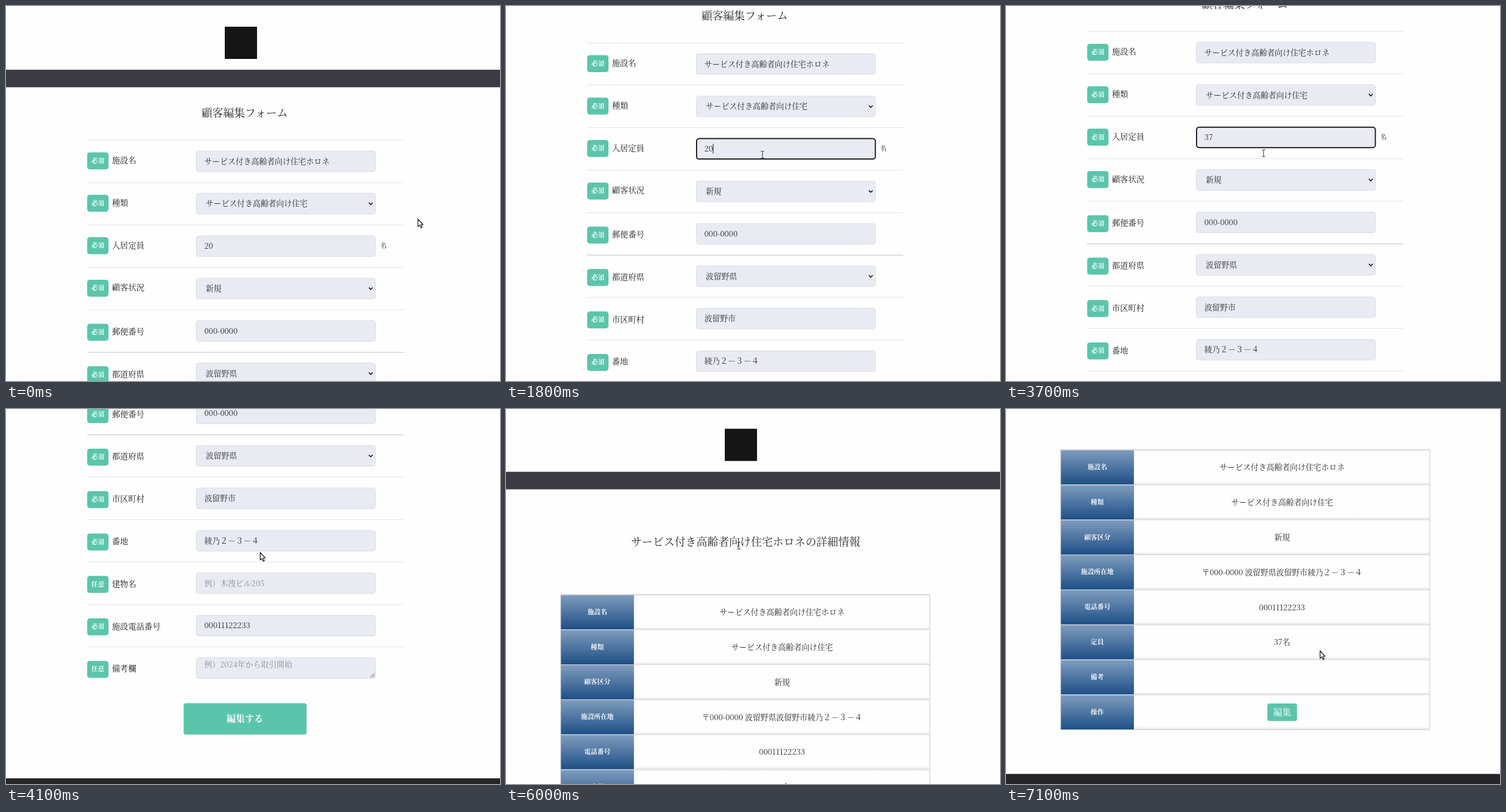
Recreate the animation shown at these times as an HTML page. Size 858 by 652 pixels, loop 7200 ms.

```html
<!DOCTYPE html>
<html lang="ja">
<head>
<meta charset="utf-8">
<title>顧客編集フォーム</title>
<style>
  html, body { margin: 0; width: 100%; height: 100%; overflow: hidden; background: #fefefe; }
  svg { display: block; width: 858px; height: 652px; }
  text { font-family: "Noto Serif CJK JP", "Noto Serif", "Noto Sans CJK JP", serif; white-space: pre; }
</style>
</head>
<body>
<svg id="stage" viewBox="0 0 858 652" xmlns="http://www.w3.org/2000/svg">
  <defs>
    <linearGradient id="blue" x1="0" y1="0" x2="0" y2="1">
      <stop offset="0" stop-color="#7f9cbd"/>
      <stop offset="1" stop-color="#1d4f86"/>
    </linearGradient>
    <linearGradient id="shade" x1="0" y1="0" x2="0" y2="1">
      <stop offset="0" stop-color="#fefefe"/>
      <stop offset="1" stop-color="#e3e3e6"/>
    </linearGradient>
  </defs>
  <rect width="858" height="652" fill="#fefefe"/>
  <g id="form"></g>
  <g id="detail"></g>
  <g id="arrow">
    <path d="M.5 .5V13.6L3.4 10.9L5.5 15.6L7.7 14.6L5.6 10H9.3Z" fill="#fff" stroke="#111" stroke-width="1.2" stroke-linejoin="round"/>
  </g>
  <g id="beam">
    <path d="M-3 -6H-1L0 -5L1 -6H3M0 -5V5M-3 6H-1L0 5L1 6H3" fill="none" stroke="#444" stroke-width="1.1"/>
  </g>
</svg>
<script>
const LOOP = 7200, STEP = 100, TICK = 84.5, ROW = 73.8, CELL = 60.85;
const GREEN = '#5bc5ab', INK = '#2c2c30';
const $ = id => document.getElementById(id);
const form = $('form'), detail = $('detail');

function add(parent, tag, attrs) {
  const el = document.createElementNS('http://www.w3.org/2000/svg', tag);
  for (const k in attrs) el.setAttribute(k, attrs[k]);
  parent.appendChild(el);
  return el;
}

const rect = (p, x, y, width, height, fill, rx = 0, more = {}) =>
  add(p, 'rect', { x, y, width, height, fill, rx, ...more });

// cy is the optical middle of the line
function text(p, str, x, cy, size, fill = INK, weight = 400, anchor = 'start') {
  const el = add(p, 'text', {
    x, y: cy + size * 0.38, 'font-size': size, fill,
    'font-weight': weight, 'text-anchor': anchor
  });
  el.textContent = str;
  return el;
}

function header(p) {
  rect(p, 380, 36, 56, 56, '#151515');
  rect(p, 0, 110.8, 858, 30.5, '#3d3b42');
}

const facility = 'サービス付き高齢者向け住宅ホロネ';
const kind = 'サービス付き高齢者向け住宅';
const pref = '波留野県', city = '波留野市', block = '綾乃２－３－４';
const zip = '000-0000', phone = '00011122233';

// label, value, field type, optional
const rows = [
  ['施設名', facility, 'input'],
  ['種類', kind, 'select'],
  ['入居定員', '20', 'count'],
  ['顧客状況', '新規', 'select'],
  ['郵便番号', zip, 'input'],
  ['都道府県', pref, 'select'],
  ['市区町村', city, 'input'],
  ['番地', block, 'input'],
  ['建物名', '例）木洩ビル205', 'hint', true],
  ['施設電話番号', phone, 'input'],
  ['備考欄', '例）2024年から取引開始', 'area', true]
];
let count, ring, caret;

function formRow([label, value, type, optional], i) {
  const y = 233 + i * ROW, drop = i < 4 ? 0 : 2.8;
  rect(form, 141, y - 0.5, 549, i === 5 ? 1.5 : 1, i === 5 ? '#cfd0d8' : '#dfe1e7');
  rect(form, 141, y + 21.5 + drop, 37, 29.5, GREEN, 4.5);
  text(form, optional ? '任意' : '必須', 159.5, y + 35.6 + drop, 11.3, '#fff', 600, 'middle');
  text(form, label, 184, y + 34.7 + drop, 14.1, '#1c1c1e', 500);

  rect(form, 330.5, y + 18.9, 311, 36, '#e9ebf2', 4, { stroke: '#dadce3' });
  const faint = type === 'hint' || type === 'area';
  const el = text(form, value, type === 'select' ? 347 : 344.5,
    y + (type === 'area' ? 30 : 36.5), 13.6, faint ? '#8d8e94' : INK);

  if (type === 'select')
    add(form, 'path', { d: `M630.2 ${y + 35.2}l3.3 3.3l3.3 -3.3`, fill: 'none', stroke: '#111', 'stroke-width': 1.6 });
  if (type === 'area')
    add(form, 'path', { d: `M633 ${y + 53}l7 -7M637 ${y + 53}l3 -3`, stroke: '#444', 'stroke-width': 1 });
  if (type === 'count') {
    count = el;
    text(form, '名', 650, y + 36.4, 11.5);
    ring = rect(form, 331, y + 18.9, 310.5, 35.5, 'none', 4.5, { stroke: '#1b1b1f', 'stroke-width': 2 });
    caret = rect(form, 0, y + 28, 1, 17, '#111');
  }
}

function buildForm() {
  header(form);
  text(form, '顧客編集フォーム', 414.5, 186, 18.9, INK, 400, 'middle');
  rows.forEach(formRow);
  rect(form, 308.5, 1069, 213.5, 54.5, GREEN, 4);
  text(form, '編集する', 415, 1095, 16, '#fff', 600, 'middle');
  rect(form, 0, 1199.5, 858, 200, '#252426');
}

const cells = [
  ['施設名', facility],
  ['種類', kind],
  ['顧客区分', '新規'],
  ['施設所在地', `〒${zip} ${pref}${city}${block}`],
  ['電話番号', phone],
  ['定員', '37名'],
  ['備考', ''],
  ['操作', '']
];

function buildDetail() {
  const top = 325;
  header(detail);
  text(detail, facility + 'の詳細情報', 416, 232, 18.95, INK, 400, 'middle');
  cells.forEach(([name, value], i) => {
    const y = top + i * CELL;
    rect(detail, 95, y, 127, CELL - 1, 'url(#blue)');
    rect(detail, 224, y + CELL - 6, 511, 5, 'url(#shade)');
    rect(detail, 95, y - 1, 641, 1, '#cfd1d6');
    text(detail, name, 158.5, y + 29, 11.4, '#fff', 600, 'middle');
    text(detail, value, 479.5, y + 29.5, 13.6, INK, 400, 'middle');
  });
  rect(detail, 95, top - 0.5, 641, CELL * 8, 'none', 0, { stroke: '#c3c5cb' });
  rect(detail, 222, top, 1, CELL * 8 - 1, '#d9dbe0');
  rect(detail, 454, 765.5, 51.5, 30.5, GREEN, 4);
  text(detail, '編集', 479.7, 780.5, 15.4, '#fff', 400, 'middle');
  rect(detail, 0, 888, 858, 200, '#252426');
}

// start, duration, wheel ticks
const formScroll = [[250, 300, 1], [850, 350, 1], [3624.5, 576, 5]];
const detailScroll = [[5975, 530, 3]];

function ease(u) {
  u = Math.min(1, Math.max(0, u));
  return u * u * (3 - 2 * u);
}
const scrollAt = (list, t) =>
  list.reduce((sum, [start, dur, n]) => sum + n * TICK * ease((t - start) / dur), 0);

// time, x, y
const path = [
  [100, 715, 370], [600, 490, 147], [1600, 445.5, 258.5], [2000, 445.5, 258.5],
  [2300, 447.5, 256], [3800, 447.5, 256], [4000, 441, 249], [4400, 441, 249],
  [4700, 415, 500], [5700, 415, 500], [6000, 404.5, 237.5],
  [6500, 404.5, 237.5], [7100, 545, 420]
];

function pointer(t) {
  const j = path.findIndex(k => k[0] > t);
  if (j === 0) return path[0].slice(1);
  if (j < 0) return path[path.length - 1].slice(1);
  const [t0, x0, y0] = path[j - 1], [t1, x1, y1] = path[j];
  const u = (t - t0) / (t1 - t0);
  return [x0 + (x1 - x0) * u, y0 + (y1 - y0) * u];
}

const FOCUS = 1700, SUBMIT = 5400;
const typing = [[FOCUS, '20'], [2200, '2'], [2500, ''], [2700, '3'], [3000, '37']];
const show = (el, on) => el.setAttribute('visibility', on ? 'visible' : 'hidden');

function draw(t) {
  const first = t < SUBMIT;
  form.style.display = first ? '' : 'none';
  detail.style.display = first ? 'none' : '';
  form.setAttribute('transform', `translate(0 ${-scrollAt(formScroll, t)})`);
  detail.setAttribute('transform', `translate(0 ${-scrollAt(detailScroll, t)})`);

  const [since, value] = typing.filter(k => k[0] <= t).pop() || typing[0];
  const focused = first && t >= FOCUS;
  count.textContent = value;
  caret.setAttribute('x', 344.2 + 7.6 * value.length);
  show(ring, focused);
  show(caret, focused && Math.floor((t - since) / 500) % 2 === 0);

  const [x, y] = pointer(t);
  const beam = (t >= 1500 && t < 3900) || (t >= 5900 && t < 6600);
  for (const id of ['arrow', 'beam']) {
    $(id).setAttribute('transform', `translate(${x} ${y})`);
    show($(id), beam === (id === 'beam'));
  }
}

buildForm();
buildDetail();
const begin = performance.now();
function tick() {
  const t = (performance.now() - begin) % LOOP;
  draw(Math.floor(t / STEP) * STEP);
  requestAnimationFrame(tick);
}
tick();
</script>
</body>
</html>
```
